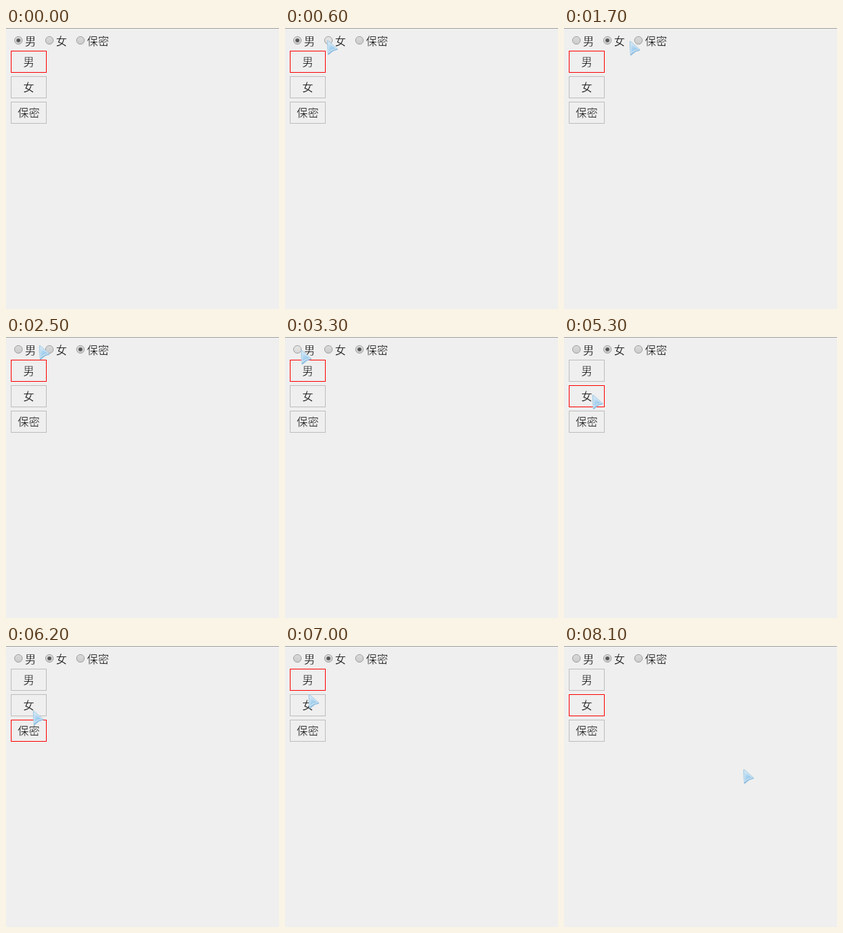
An HTML page for the animation above (8.2 s loop, 396 by 408 pixels).

```html
<!DOCTYPE html>
<html lang="zh-CN">
<head>
<meta charset="utf-8">
<title>性别选择</title>
<style>
  html, body { margin: 0; width: 100%; height: 100%; overflow: hidden; background: #efefef; }
  svg { position: absolute; left: 0; top: 0; display: block; }
  text {
    font: 300 16px "Noto Sans CJK SC", "Noto Sans CJK", sans-serif;
    fill: #000; stroke: #efefef; stroke-width: .4;
  }
  .ring { fill: url(#ring); stroke: #a2a2a2; }
  .hover .ring { fill: url(#glow); }
  .dot { fill: #555; visibility: hidden; }
  .on .dot { visibility: visible; }
  .box { fill: none; stroke: #bdbdbd; }
  .on .box { stroke: #f00; }
</style>
</head>
<body>
<svg width="396" height="408" viewBox="0 0 396 408">
  <defs>
    <linearGradient id="ring" x2="0" y2="1">
      <stop stop-color="#dadada"/><stop offset="1" stop-color="#cbcbcb"/>
    </linearGradient>
    <linearGradient id="glow" x2="0" y2="1">
      <stop stop-color="#e6e6e6"/><stop offset="1" stop-color="#d8d8d8"/>
    </linearGradient>
    <linearGradient id="ice" x2=".6" y2="1">
      <stop stop-color="#d3e8f6"/><stop offset="1" stop-color="#8ac2ea"/>
    </linearGradient>
  </defs>
  <rect width="396" height="408" fill="#efefef"/>
  <rect width="396" height="1" fill="#a0a0a0"/>
  <g id="radios"></g>
  <g id="buttons"></g>
  <g id="cursor" stroke-linejoin="round">
    <path d="M2 2 15.5 14 9 16 3 21Z" fill="#79b3de" stroke="#86bae0" stroke-width="1.8"/>
    <path d="M2 1.5 15 13 8.5 15 2.5 19.5Z" fill="#eef7fd" stroke="#b9d6ea" stroke-width="1.4"/>
    <path d="M3 4 13 12.7 8 14 3.5 17.5Z" fill="url(#ice)"/>
  </g>
</svg>
<script>
const LOOP = 8200, STEP = 100;
const labels = ['男', '女', '保密'];
const ringX = [18, 63, 108];
const $ = id => document.getElementById(id);
const build = (id, item) => {
  $(id).innerHTML = labels.map((s, i) => `<g>${item(s, i)}</g>`).join('');
  return [...$(id).children];
};

const radios = build('radios', (s, i) => `
  <circle class="ring" cx="${ringX[i]}" cy="18" r="5.6"/>
  <circle class="dot" cx="${ringX[i]}" cy="18" r="2.8"/>
  <text x="${ringX[i] + 9.5}" y="25">${s}</text>`);
const buttons = build('buttons', (s, i) => `
  <rect class="box" x="7.5" y="${33.5 + 37 * i}" width="51" height="31"/>
  <text x="33" y="${55 + 37 * i}" text-anchor="middle">${s}</text>`);

// Pointer gestures: start, end, resting point and, for curved ones, the bend
const entry = [253, 107];
const gestures = [
  { from: 100, until: 600, to: [60, 17], bend: [-80, -25] },
  { from: 1100, until: 1900, to: [104, 15], bend: [85, 22] },
  { from: 2100, until: 2800, to: [9, 14], bend: [50, 8] },
  { from: 2900, until: 3600, to: [14, 19], bend: [32, 19] },
  { from: 3700, until: 4300, to: [57, 15], bend: [30, 24] },
  { from: 4500, until: 4900, to: [40, 83], bend: [215, 145] },
  { from: 5400, until: 5700, to: [38, 118], bend: [38, 124] },
  { from: 6000, until: 6600, to: [39, 44] },
  { from: 6900, until: 7000, to: [33, 69] },
  { from: 7100, until: 7300, to: [33, 79] },
  { from: 7800, until: 8100, to: [259, 178], bend: [80, 35] }
];
const clicks = [1200, 2200, 3800, 4600, 5100, 5700, 6600, 7300];

function pointer(t) {
  let pos = entry;
  for (const { from, until, to, bend } of gestures) {
    if (t < from) break;
    const p = Math.min(1, (t - from) / (until - from)), q = 1 - p;
    pos = pos.map((a, i) => {
      const mid = bend ? bend[i] : (a + to[i]) / 2;
      return Math.round(q * q * a + 2 * p * q * mid + p * p * to[i]);
    });
  }
  return pos;
}

// Each click selects whatever the pointer was over just before it
function selection(t) {
  const chosen = { radio: 0, button: 0 };
  for (const c of clicks.filter(c => c <= t)) {
    const [x, y] = pointer(c - STEP);
    if (y < 32) chosen.radio = Math.round((x - ringX[0]) / 45);
    else chosen.button = Math.floor((y + 1 - 33) / 37);
  }
  return chosen;
}

function draw(ms) {
  const t = Math.floor(ms % LOOP / STEP) * STEP;
  const [x, y] = pointer(t);
  const visible = t >= gestures[0].from;
  const { radio, button } = selection(t);
  radios.forEach((g, i) => {
    g.classList.toggle('on', i === radio);
    g.classList.toggle('hover', visible && Math.hypot(x + 1 - ringX[i], y + 1 - 18) < 7);
  });
  buttons.forEach((g, i) => g.classList.toggle('on', i === button));
  $('cursor').style.display = visible ? '' : 'none';
  $('cursor').setAttribute('transform', `translate(${x} ${y})`);
}

const start = performance.now();
function tick() {
  draw(performance.now() - start);
  requestAnimationFrame(tick);
}
tick();
</script>
</body>
</html>
```
